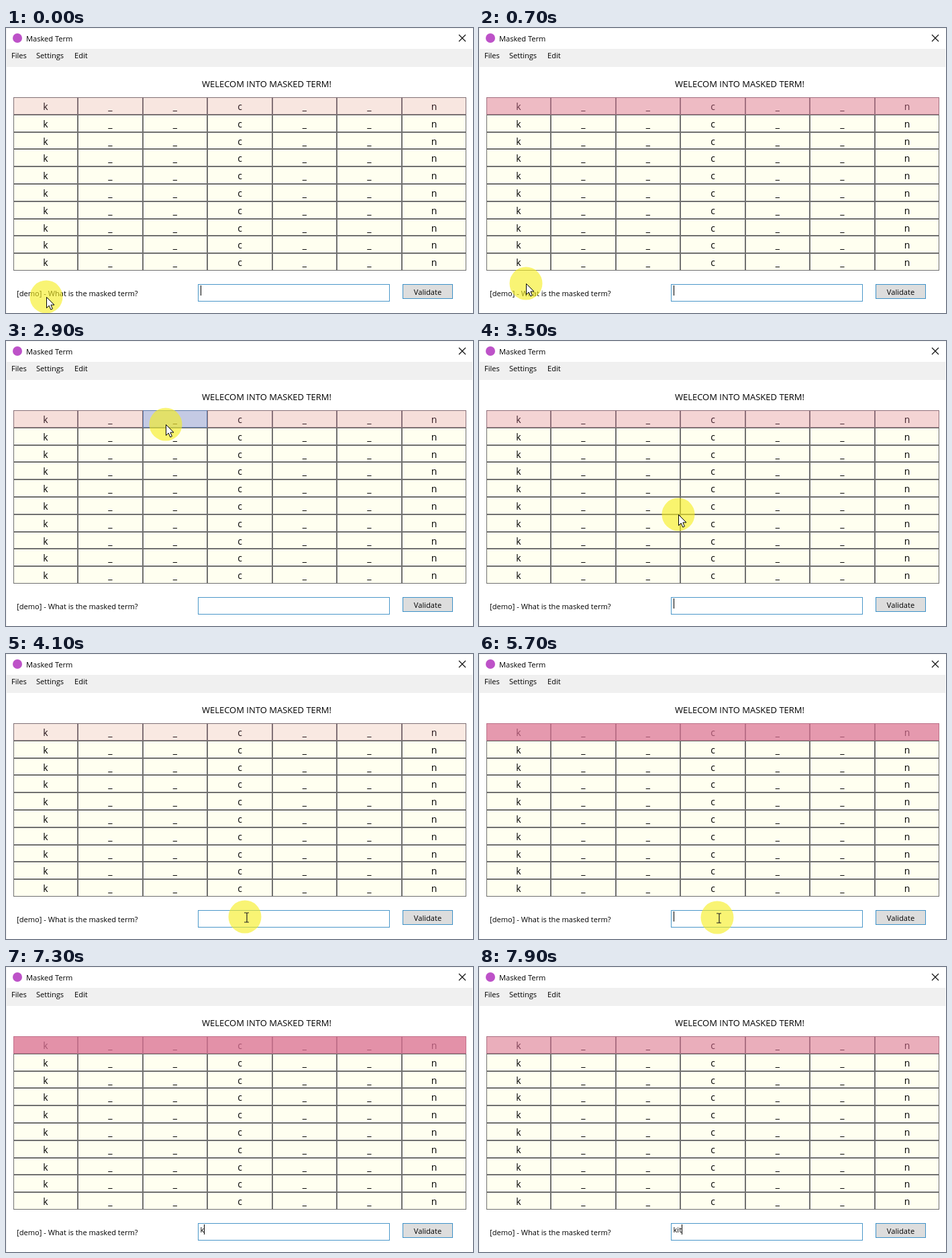
Recreate the animation shown at these times as an HTML page. Size 696 px wide and 424 px high, loop 8000 ms.

```html
<!DOCTYPE html>
<html lang="en">
<head>
<meta charset="utf-8">
<title>Masked Term</title>
<style>
html, body { margin: 0; width: 100%; height: 100%; overflow: hidden; background: #fff; }
svg { display: block; font: 11.1px "Open Sans", "Noto Sans", sans-serif; fill: #000; }
.cells { font-size: 14px; text-anchor: middle; }
</style>
</head>
<body>
<svg id="stage" width="696" height="424" viewBox="0 0 696 424">
  <rect width="696" height="424" fill="#fff"/>
  <path d="M0 .5H696M.5 0V424" stroke="#f3f3f3"/>
  <circle cx="17" cy="15" r="7" fill="#bd52c8"/>
  <text x="30" y="20">Masked Term</text>
  <path d="M675 10l10 10m0-10l-10 10" stroke="#111" stroke-width="1.2"/>
  <rect x="1" y="31" width="694" height="27" fill="#f0f0f0"/>
  <text x="8" y="45">Files</text>
  <text x="45" y="45">Settings</text>
  <text x="102" y="45">Edit</text>
  <text x="388.5" y="88" font-size="13" text-anchor="middle">WELECOM INTO MASKED TERM!</text>
  <rect x="11" y="103" width="675" height="26" fill="palevioletred"/>
  <g id="grid"></g>
  <text x="16" y="399">[demo] - What is the masked term?</text>
  <rect x="286.5" y="381.5" width="285" height="25" fill="#fff" stroke="#4a97c9"/>
  <text id="typed" x="289.5" y="395"></text>
  <path id="caret" d="M290.5 383v15" stroke="#000"/>
  <rect x="591.5" y="381.5" width="74" height="21" fill="#ddd" stroke="#3c91c8"/>
  <text x="628.5" y="397" text-anchor="middle">Validate</text>
  <g id="pointer">
    <circle r="24.5" fill="#f5ee20" fill-opacity=".62"/>
    <path id="arrow" d="M.5 .5V16.5L4.2 13L6.8 19L9.4 17.8L6.9 12H12Z" fill="#fff" stroke="#000"/>
    <path id="beam" d="M-1 -6h3q1 0 1 1v12q0 1-1 1h-3M6 -6h-2q-1 0-1 1v12q0 1 1 1h2" fill="none" stroke="#222" stroke-width="1.2"/>
  </g>
</svg>
<script>
const $ = id => document.getElementById(id);
const LOOP = 8000;

function add(parent, tag, attrs, text = "") {
  const el = document.createElementNS("http://www.w3.org/2000/svg", tag);
  for (const key in attrs) el.setAttribute(key, attrs[key]);
  el.textContent = text;
  return parent.appendChild(el);
}

const edgeX = i => Math.round(11 + i * 675 / 7);
const edgeY = i => Math.round(103 + i * 25.8);
const cells = [];
let firstRow;

for (let r = 0; r < 10; r++) {
  const row = add($("grid"), "g", { class: "cells" });
  firstRow ??= row;
  [..."k__c__n"].forEach((letter, c) => {
    const x = edgeX(c), y = edgeY(r), w = edgeX(c + 1) - x, h = edgeY(r + 1) - y;
    cells.push(add(row, "rect", { x: x + .5, y: y + .5, width: w - 1, height: h - 1 }));
    add(row, "text", { x: x + w / 2, y: y + 18.5 }, letter);
  });
}

// start, first row opacity, pointer [x, y], caret shown, typed text, hovered cell
const states = [
  [0, .83, [60, 400], 1, "", -1],
  [500, .56, [70, 380], 1, "", -1],
  [700, .53, [70, 380], 1, "", -1],
  [1300, .14, [85, 325], 1, "", 63],
  [2900, .77, [238, 124], 0, "", 2],
  [3500, .7, [297, 258], 1, "", -1],
  [3700, .73, [297, 258], 0, "", -1],
  [4100, .85, [356, 391], 0, "", -1],
  [5700, .29, [355, 392], 1, "", -1],
  [6100, .42, [355, 392], 0, "", -1],
  [7300, .23, null, 1, "k", -1],
  [7500, .33, null, 1, "ki", -1],
  [7900, .43, null, 1, "kit", -1]
];

const show = (id, on) => $(id).setAttribute("visibility", on ? "visible" : "hidden");

function draw(now) {
  const t = now % LOOP;
  const [, opacity, pos, caret, text, hover] = states.findLast(s => s[0] <= t);

  firstRow.setAttribute("opacity", opacity);
  cells.forEach((cell, i) => {
    cell.setAttribute("fill", i === hover ? "#bee6fd" : "#fffff0");
    cell.setAttribute("stroke", i === hover ? "#3c7fb1" : "#707070");
  });

  $("typed").textContent = text;
  const shift = text ? Math.round($("typed").getComputedTextLength()) - 1 : 0;
  $("caret").setAttribute("transform", `translate(${shift})`);
  show("caret", caret);

  const inField = pos && pos[1] > 380 && pos[0] > 286;
  show("arrow", pos && !inField);
  show("beam", inField);
  $("pointer").setAttribute("display", pos ? "inline" : "none");
  if (pos) $("pointer").setAttribute("transform", `translate(${pos})`);

  requestAnimationFrame(draw);
}
requestAnimationFrame(draw);
</script>
</body>
</html>
```
